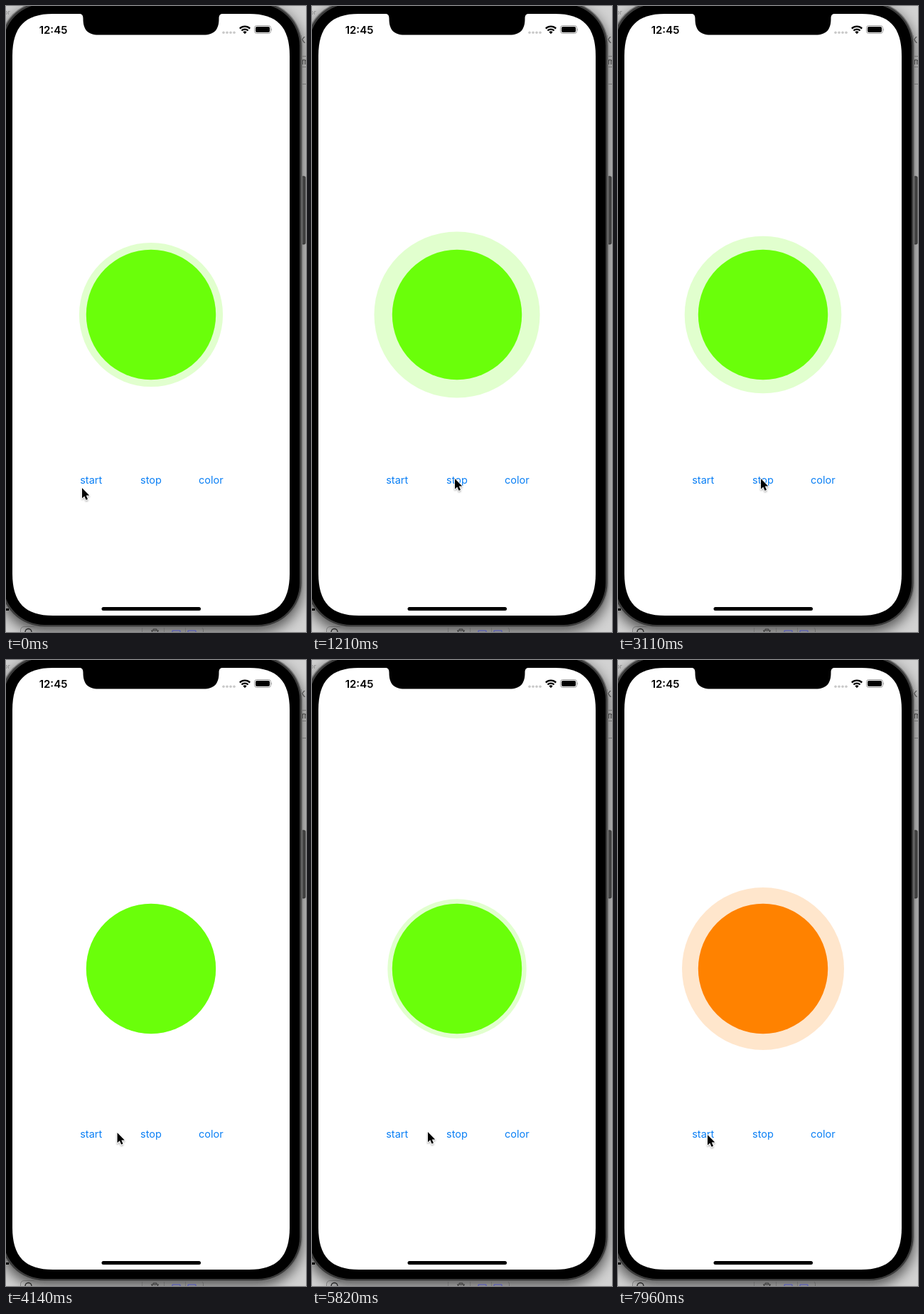
Animation of 422 by 878 pixels, one loop 8 s. Source, as an HTML page:

```html
<!DOCTYPE html>
<html lang="en">
<head>
<meta charset="utf-8">
<title>Pulse button</title>
<style>
  html, body { margin: 0; width: 100%; height: 100%; overflow: hidden; background: #fff; }
  svg { display: block; width: 100%; height: 100%; }
  text { font-family: Inter, Roboto, sans-serif; }
  .btn { font-size: 14.5px; fill: #0a7ff5; text-anchor: middle; }
</style>
</head>
<body>
<svg viewBox="0 0 422 878" xmlns="http://www.w3.org/2000/svg">
  <defs>
    <filter id="soft" x="-20%" y="-20%" width="140%" height="140%"><feGaussianBlur stdDeviation="9"/></filter>
    <filter id="drop" x="-60%" y="-40%" width="220%" height="200%">
      <feDropShadow dx="0" dy="1.5" stdDeviation="1.2" flood-opacity=".35"/>
    </filter>
  </defs>

  <!-- desktop behind the phone -->
  <rect width="422" height="878" fill="#d2d2d2"/>
  <rect x="-9" y="0" width="426" height="878" rx="62" fill="#000" opacity=".6" filter="url(#soft)"/>
  <g fill="none" stroke="#555" stroke-width="1">
    <rect x="20.500" y="870.500" width="257" height="20" rx="5" opacity=".55"/>
    <path d="M191.500 871v7M222.500 871v7M252.500 871v7" opacity=".4"/>
    <circle cx="31.500" cy="878" r="4.500" stroke="#222" stroke-width="1.300"/>
    <path d="M204 876h11M207 875.500v-1.500h5v1.500M205.500 876v4M213.500 876v4" stroke="#333"/>
    <path d="M234 880v-4h11v4M256 880v-4h11v4" stroke="#4b50c0"/>
    <path d="M417 70.500h7M417 85.500h7M417 109.500h7" opacity=".6"/>
  </g>
  <text x="413" y="52" font-size="15" fill="#555">k</text>
  <text x="416" y="82" font-size="11" fill="#333">m</text>
  <text x="-3" y="12" font-size="9" fill="#888">or</text>

  <!-- phone body -->
  <rect x="416" y="239" width="5" height="95" rx="1.500" fill="#444" stroke="#222" stroke-width=".8"/>
  <rect x="-9" y="-7" width="426" height="879" rx="63" fill="#777"/>
  <rect x="-7.500" y="-5.500" width="423" height="876" rx="61.500" fill="#3c3c3c"/>
  <rect x="-4.500" y="-3" width="417.500" height="871" rx="59" fill="#000"/>
  <rect x="0" y="845" width="4" height="3" fill="#000"/>
  <path d="M9 70C9 29 27 11 66 11H342C381 11 399 29 399 70V796C399 837 381 855 342 855H66C27 855 9 837 9 796Z" fill="#fff"/>
  <path d="M102 10.500C107 11 108.500 13 108.500 18C108.500 33 115 40.500 130 40.500H278C293 40.500 299.500 33 299.500 18C299.500 13 301 11 306 10.500Z" fill="#000"/>
  <rect x="134.500" y="843" width="139.500" height="5" rx="2.500" fill="#000"/>

  <!-- status bar -->
  <text x="66.500" y="38.600" font-size="15" font-weight="600" text-anchor="middle">12:45</text>
  <g fill="#c9c9c9">
    <circle cx="306" cy="37.300" r="1.800"/><circle cx="311" cy="37.300" r="1.800"/>
    <circle cx="316" cy="37.300" r="1.800"/><circle cx="321" cy="37.300" r="1.800"/>
  </g>
  <g fill="none" stroke="#000" stroke-width="2.200">
    <path d="M328.800 31.600a10.200 10.200 0 0 1 14.400 0M331.400 34.500a6.500 6.500 0 0 1 9.200 0"/>
  </g>
  <path d="M336 39.300l-2.600-2.700a3.700 3.700 0 0 1 5.200 0Z"/>
  <rect x="349.500" y="27.500" width="23" height="11" rx="3.300" fill="none" stroke="#999"/>
  <rect x="351" y="29" width="20" height="8" rx="2"/>
  <path d="M373.500 31.200q1.600 1.800 0 3.800Z" fill="#999"/>

  <!-- app -->
  <circle id="halo" cx="204" cy="433" r="91" fill-opacity=".2"/>
  <circle id="disc" cx="204" cy="433" r="91.200"/>
  <text class="btn" x="119.700" y="670">start</text>
  <text class="btn" x="204" y="670">stop</text>
  <text class="btn" x="288.300" y="670">color</text>
  <path id="cursor" d="M0 0V14.400L3.300 11.400L5.600 16.700L8 15.700L5.800 10.500H10.300Z" fill="#000"
        stroke="#fff" stroke-width="1.600" stroke-linejoin="round" paint-order="stroke" filter="url(#drop)"/>
</svg>
<script>
const LOOP = 8000, RADIUS = 91, GROWTH = 0.3, HALF = 500;
const COLOR_CLICK = 6790;
const GREEN = '#6aff0a', ORANGE = '#ff8200';

// [start click, stop click]
const runs = [[-207, 3285], [4656, 6245], [7591, LOOP]];

// cursor stops: [time, x, y]
const path = [
  [350, 107, 676], [800, 201, 663],
  [3290, 201, 663], [3460, 306, 674],
  [3680, 306, 674], [4000, 143, 663],
  [4110, 143, 663], [4270, 294, 662], [4430, 143, 662],
  [4540, 143, 662], [4640, 133, 661],
  [5650, 133, 661], [6020, 201, 663],
  [6260, 201, 663], [6480, 317, 670], [6640, 285, 666],
  [6960, 285, 666], [7440, 126, 666]
];

const [halo, disc, cursor] = ['halo', 'disc', 'cursor'].map(id => document.getElementById(id));
const ease = x => (1 - Math.cos(Math.PI * x)) / 2;

function haloRadius(t) {
  const run = runs.find(([from, to]) => t >= from && t < to);
  return run ? RADIUS * (1 + GROWTH * ease((t - run[0]) / HALF)) : RADIUS;
}

function cursorAt(t) {
  const i = path.findIndex(p => p[0] > t);
  if (i < 0) return path[path.length - 1].slice(1);
  if (i === 0) return path[0].slice(1);
  const [t0, x0, y0] = path[i - 1], [t1, x1, y1] = path[i];
  const k = ease((t - t0) / (t1 - t0));
  return [x0 + (x1 - x0) * k, y0 + (y1 - y0) * k];
}

function draw(t) {
  const color = t < COLOR_CLICK ? GREEN : ORANGE;
  halo.setAttribute('r', haloRadius(t).toFixed(2));
  halo.setAttribute('fill', color);
  disc.setAttribute('fill', color);
  const [x, y] = cursorAt(t);
  cursor.setAttribute('transform', `translate(${x.toFixed(2)} ${y.toFixed(2)})`);
}

const begin = performance.now();
function tick() {
  draw((performance.now() - begin) % LOOP);
  requestAnimationFrame(tick);
}
tick();
</script>
</body>
</html>
```
